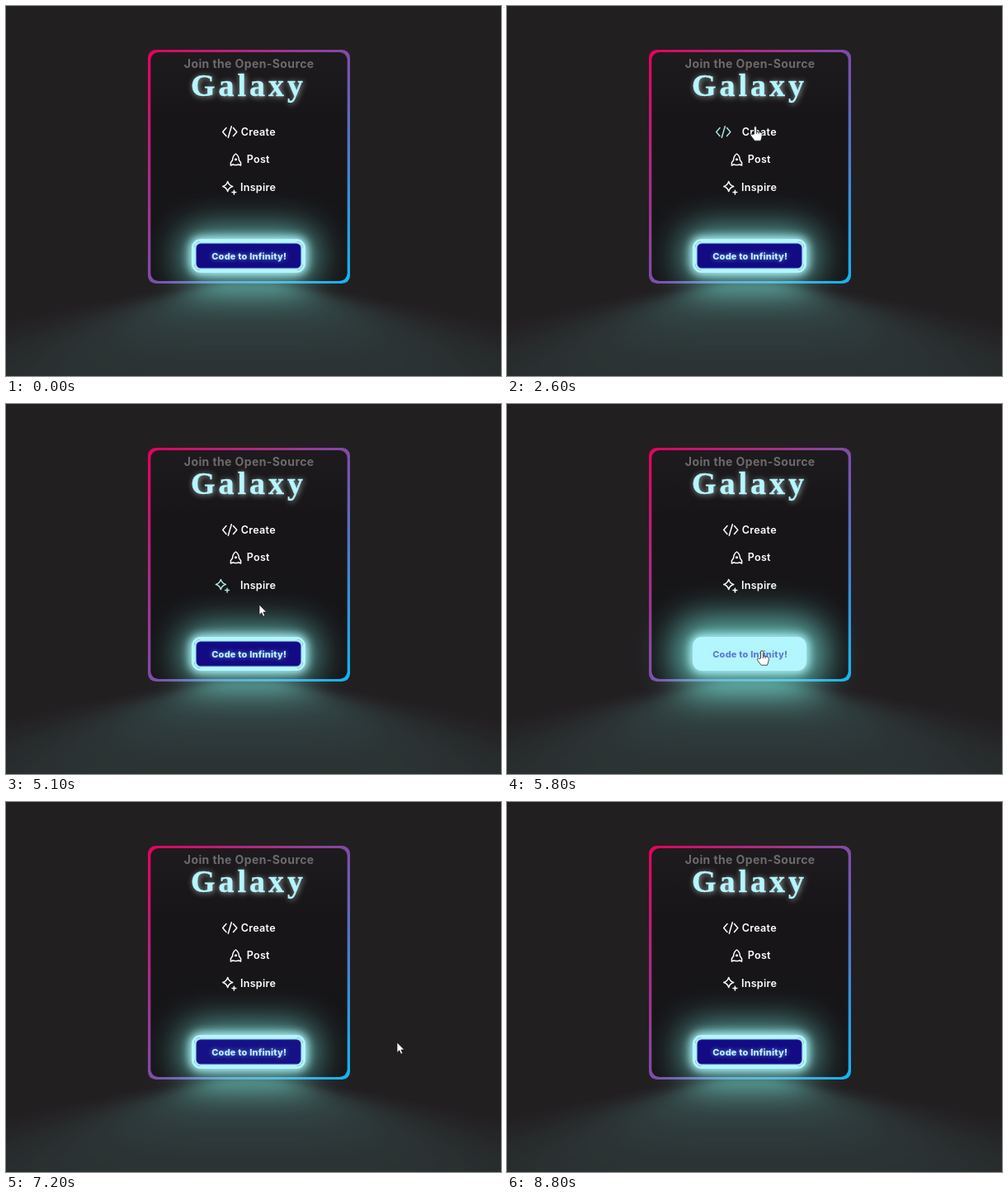
These frames come from a looping animation (600x448 px, 8.9 s). An HTML page:

```html
<!DOCTYPE html>
<html lang="en">
<head>
<meta charset="utf-8">
<title>Galaxy card</title>
<style>
  html, body { margin: 0; width: 100%; height: 100%; overflow: hidden; background: #221f21; }
  #stage { position: relative; width: 600px; height: 448px; overflow: hidden; background: #221f21; }
  svg { position: absolute; left: 0; top: 0; }
  text { font-family: Inter, "Open Sans", sans-serif; font-weight: 600; fill: #fff; }
  .lead { font-size: 14px; font-weight: 700; letter-spacing: .4px; fill: #6d6a6e; }
  .title {
    font: 700 38px "Liberation Serif", serif; letter-spacing: 4px;
    fill: #b5f6ff; stroke: #b5f6ff; stroke-width: .4px;
    filter: drop-shadow(1px 1px 3.5px rgba(225, 240, 240, .65));
  }
  .item { font-size: 12.6px; letter-spacing: .25px; }
  .icon { fill: none; stroke-width: 1.5; stroke-linecap: round; stroke-linejoin: round; }
  #button, #floor { position: absolute; box-sizing: border-box; }
  #button {
    left: 225px; top: 282px; width: 138px; height: 41px;
    border: 3px solid #b3f6fd; border-radius: 11px; background-clip: padding-box;
  }
  #floor {
    left: 228px; top: 327px; width: 132px; height: 36px;
    background: rgba(123, 240, 228, .78); filter: blur(21.6px); opacity: .7;
    transform: perspective(16.2px) rotateX(35deg) scale(1, .6);
  }
  #label { font-size: 11px; font-weight: 800; letter-spacing: .2px; }
</style>
</head>
<body>
<div id="stage">
  <svg width="600" height="448">
    <defs>
      <linearGradient id="edge" x2="1" y2="1">
        <stop stop-color="#e8005c"/><stop offset=".5" stop-color="#804ba8"/><stop offset="1" stop-color="#10b8f3"/>
      </linearGradient>
      <linearGradient id="panel" x2="0" y2="1">
        <stop stop-color="#1d1b1d"/><stop offset=".3" stop-color="#171518"/><stop offset="1" stop-color="#161518"/>
      </linearGradient>
    </defs>
    <rect x="172" y="53" width="245" height="283" rx="9.5" fill="url(#edge)"/>
    <rect x="175.3" y="56" width="238.4" height="277" rx="9.5" fill="url(#panel)"/>
  </svg>
  <div id="floor"></div>
  <div id="button"></div>
  <svg width="600" height="448">
    <text class="lead" x="294.7" y="74.8" text-anchor="middle">Join the Open-Source</text>
    <text class="title" x="224" y="109">Galaxy</text>

    <g class="icon">
      <path d="M267 147.5l-4.3 5 4.3 5M275.5 147.5l4.3 5-4.3 5M273.3 145.8l-4 13.4"/>
    </g>
    <text class="item" x="284.8" y="156.6">Create</text>

    <g class="icon">
      <path d="M278.5 179c2.6 1.8 3.9 4.3 3.9 7.5l2.2 3.2v3.3l-3-1.2q-3.1 1.6-6.2 0l-3 1.2v-3.3l2.2-3.2c0-3.2 1.3-5.7 3.9-7.5z"/>
      <circle cx="278.5" cy="185.7" r=".8"/>
    </g>
    <text class="item" x="291.7" y="190.4">Post</text>

    <g class="icon">
      <path d="M268.7 212.4q1.3 4.8 6 6.1-4.7 1.3-6 6.1-1.3-4.8-6-6.1 4.7-1.3 6-6.1z"/>
      <path d="M276.4 223.2v4.8M274 225.6h4.8"/>
    </g>
    <text class="item" x="284" y="224.2">Inspire</text>

    <text id="label" x="294.7" y="306.5" text-anchor="middle">Code to Infinity!</text>

    <g id="cursor">
      <path d="M0 0v12.4l2.8-2.6 1.9 4.4 2.1-.9-1.9-4.3h3.9z" fill="#fff" stroke="#111" stroke-width=".7"/>
      <path d="M-1.4 9V1.2a1.4 1.4 0 0 1 2.8 0V6l4.8 1c1.6.4 2.3 1.3 2.1 2.8l-.7 4.2-1.1 3.2H-.8l-4.7-6.2c-.8-1.3.8-2.5 1.9-1.5zM1.4 6v3M4 6.6v2.6" fill="#fff" stroke="#222" stroke-width=".8"/>
      <path d="M-2.5-6h1.8L0-5.4.7-6h1.8M0-5.4V5.4M-2.5 6h1.8L0 5.4.7 6h1.8" fill="none" stroke="#d8d8d8"/>
    </g>
  </svg>
</div>
<script>
const LOOP = 8900, STEP = 100, FADE = 300;
const $ = id => document.getElementById(id);
const button = $("button"), label = $("label"), cursor = $("cursor");
const icons = [...document.querySelectorAll(".icon")];

// Time, x and y of the pointer's hot spot
const path = [
  [800, 290, 5], [900, 291, 17], [1000, 292, 30], [1400, 296, 72], [1700, 298, 100],
  [2150, 300, 137], [2600, 301, 146], [2950, 302, 170], [3500, 303, 186], [4100, 305, 199],
  [4250, 305, 205], [4700, 306, 220], [5050, 307, 237], [5450, 308, 283], [5800, 309, 299],
  [6500, 312, 302], [6900, 358, 298], [7000, 385, 296], [7200, 474, 291], [7400, 592, 287]
];
const rowHover = [[2150, 2950], [2950, 4200], [4200, 5050]];
const buttonHover = [5430, 6930];

const clamp = v => Math.max(0, Math.min(1, v));
const smooth = v => v * v * (3 - 2 * v);
const mix = (a, b, k) => a + (b - a) * k;
const blend = (a, b, k) => `rgb(${a.map((v, i) => Math.round(mix(v, b[i], k)))})`;
const hover = (t, [from, to]) => smooth(clamp((t - from) / FADE)) - smooth(clamp((t - to) / FADE));

function pointerAt(t) {
  const i = path.findIndex(p => p[0] > t);
  if (i === 0 || t > path[path.length - 1][0]) return null;
  if (i < 0) return path[path.length - 1].slice(1);
  const a = path[i - 1], b = path[i], k = (t - a[0]) / (b[0] - a[0]);
  return [mix(a[1], b[1], k), mix(a[2], b[2], k)];
}

// 0 arrow, 1 hand, 2 text beam
function pointerKind(x, y) {
  if (x > 363) return 0;
  if (y >= 62 && y < 118) return 2;
  const onRow = [152, 186, 220].some(row => Math.abs(y - row) < 11);
  return onRow || y > 282 ? 1 : 0;
}

function drawButton(k) {
  const glow = "rgb(179,246,253)";
  button.style.backgroundColor = blend([19, 10, 133], [179, 246, 253], k);
  button.style.backgroundClip = k > .98 ? "border-box" : "padding-box";
  button.style.boxShadow = `0 0 10.8px 2.7px ${glow}, inset 0 0 1px 2.5px ${glow}, ` +
    `0 0 43px ${mix(10.8, 21.6, k)}px rgba(123,240,228,.78)`;
  label.style.fill = blend([181, 244, 255], [95, 124, 210], k);
  label.style.filter = `drop-shadow(0 0 2.7px rgba(179,246,253,${mix(.6, .3, k)}))`;
}

function draw(t) {
  icons.forEach((icon, i) => {
    const k = hover(t, rowHover[i]);
    icon.setAttribute("transform", `translate(${-9 * k} 0)`);
    icon.setAttribute("stroke", blend([255, 255, 255], [165, 226, 222], k));
  });
  drawButton(hover(t, buttonHover));

  const spot = pointerAt(t);
  cursor.style.display = spot ? "" : "none";
  if (!spot) return;
  cursor.setAttribute("transform", `translate(${spot.map(Math.round)})`);
  const kind = pointerKind(...spot);
  [...cursor.children].forEach((shape, i) => shape.style.display = i === kind ? "" : "none");
}

const start = performance.now();
function tick() {
  const t = (performance.now() - start) % LOOP;
  draw(Math.floor(t / STEP) * STEP);
  requestAnimationFrame(tick);
}
tick();
</script>
</body>
</html>
```
